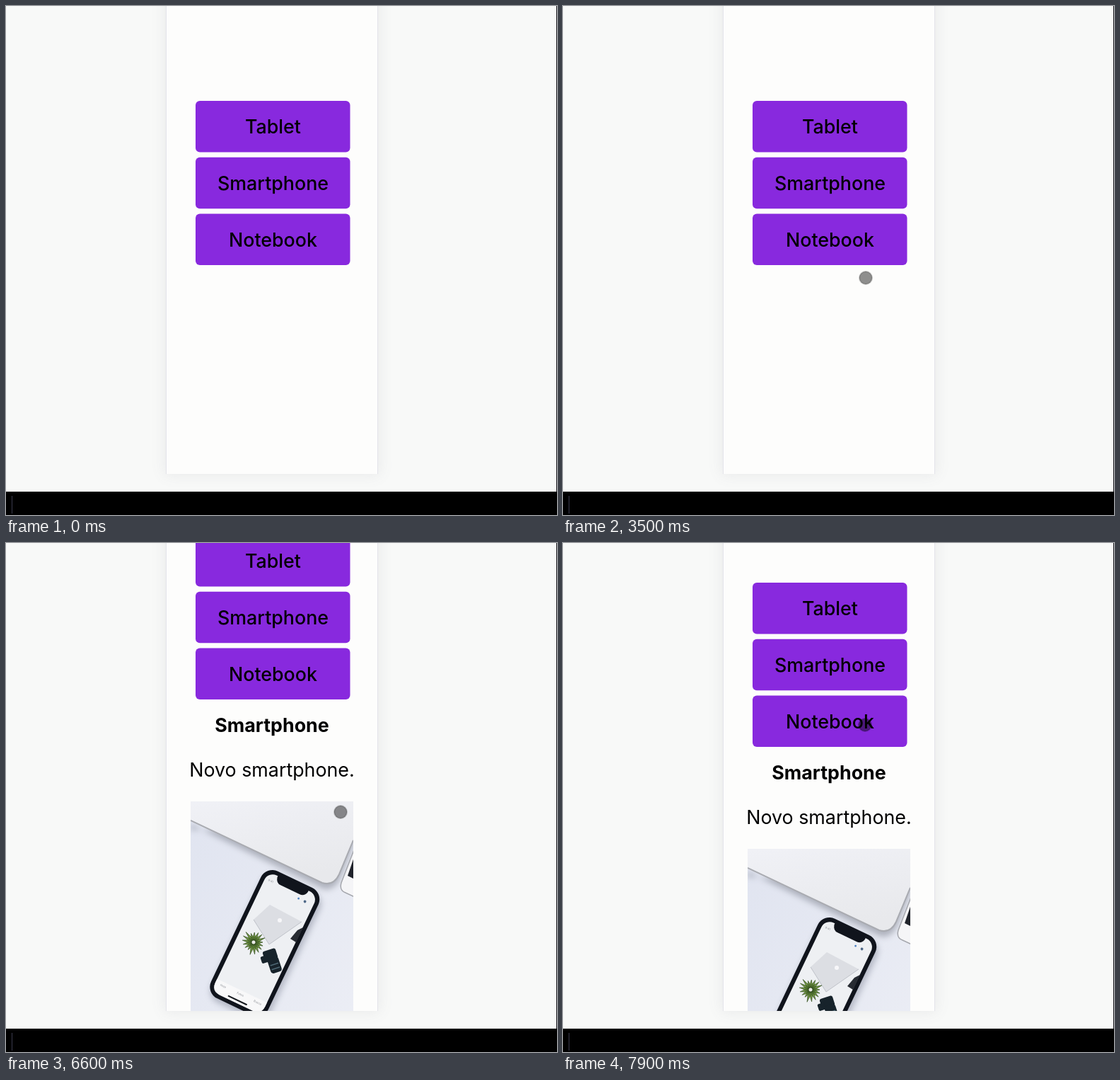
These frames come from a looping animation (779x719 px, 8 s). An HTML page:

```html
<!DOCTYPE html>
<html lang="pt">
<head>
<meta charset="utf-8">
<style>
html, body { margin: 0; width: 100%; height: 100%; overflow: hidden; background: #f8f9f8; }
svg { display: block; }
text { font-family: Inter, "Open Sans", sans-serif; font-size: 26.8px; text-anchor: middle; }
.tiny { font-size: 4px; fill: #8d9096; }
</style>
</head>
<body>
<svg width="779" height="719" viewBox="0 0 779 719">
  <defs>
    <clipPath id="card"><rect x="226" y="0" width="300" height="661"/></clipPath>
    <clipPath id="frame"><rect width="230" height="345"/></clipPath>
    <filter id="soft" x="-30%" y="-30%" width="160%" height="160%"><feGaussianBlur stdDeviation="10"/></filter>
    <filter id="blur"><feGaussianBlur stdDeviation="4"/></filter>
    <linearGradient id="desk" x2="1" y2="1"><stop stop-color="#e0e4f0"/><stop offset="1" stop-color="#eceef5"/></linearGradient>
    <linearGradient id="lid" x2=".3" y2="1"><stop stop-color="#f0f1f6"/><stop offset="1" stop-color="#e8e9ec"/></linearGradient>
  </defs>

  <rect width="779" height="719" fill="#f8f9f8"/>
  <rect x="224" y="-40" width="304" height="703" fill="#667" opacity=".1" filter="url(#soft)"/>
  <rect x="226" y="-2" width="300" height="663" fill="#fdfdfc"/>
  <path d="M226.5 0V661M525.5 0V661" stroke="#e4e4ea"/>

  <g clip-path="url(#card)">
    <g id="page">
      <g id="buttons"></g>
      <g id="result">
        <text x="376" y="412" font-weight="700">Smartphone</text>
        <text x="376" y="475">Novo smartphone.</text>
      </g>
      <g id="photo" transform="translate(261 510)" clip-path="url(#frame)">
        <rect width="230" height="345" fill="url(#desk)"/>
        <path d="M0 32L188 124Q204 126 212 108L230 62V40H0z" fill="#777b88" opacity=".5" filter="url(#blur)"/>
        <path d="M0 0H230V54L210 103Q203 119 188 116L0 28z" fill="url(#lid)"/>
        <path d="M0 27L186 115Q202 120 210 103L230 55" fill="none" stroke="#a9abb1" stroke-width="2"/>
        <path d="M232 66L213 115Q210 126 219 129L232 135z" fill="#f5f5f7" stroke="#a5a7ad" stroke-width="1.5"/>
        <path d="M232 76L222 105L232 110z" fill="#20232b"/>
        <g transform="translate(107 91) rotate(25.5)">
          <rect x="3" y="5" width="92" height="199" rx="18" fill="#555b70" opacity=".35" filter="url(#blur)"/>
          <rect width="90" height="199" rx="18" fill="#10141c"/>
          <rect x="6" y="6" width="78" height="187" rx="13" fill="#eef0f3"/>
          <path d="M21 5H69V8Q67 16 60 16H30Q23 16 21 8z" fill="#10141c"/>
          <text class="tiny" x="15" y="18">9:41</text>
          <circle cx="61" cy="22" r="1.4" fill="#4b7fc0"/>
          <circle cx="71" cy="22" r="1.9" fill="#4d6787"/>
          <path d="M6 174H84V180Q84 193 71 193H19Q6 193 6 180z" fill="#f8f8f9"/>
          <text class="tiny" x="18" y="181">Hoje</text>
          <text class="tiny" x="45" y="181">Fotos</text>
          <text class="tiny" x="72" y="181">Busca</text>
          <path d="M31 189H59" stroke="#15181e" stroke-width="2" stroke-linecap="round"/>
        </g>
        <path d="M89 167L112 146L157 170L111 202z" fill="#dcdee3"/>
        <path d="M89 167L111 202L157 170" fill="none" stroke="#bfc2c9"/>
        <circle cx="126" cy="168" r="3" fill="#f7f7f9"/>
        <path d="M141 194L151 182L159 178L149 199z" fill="#272b32"/>
        <circle cx="89" cy="204" r="8" fill="#e9e9e5"/>
        <path id="leaves" fill="#6f9440" stroke="#344f21" stroke-width=".7"/>
        <g transform="translate(115 226) rotate(-18)" fill="#17232b">
          <rect x="-9" y="-17" width="19" height="15" rx="3"/>
          <rect x="-14" y="-11" width="10" height="10" rx="2"/>
          <rect x="-6" y="-5" width="16" height="22" rx="4"/>
          <path d="M-4 5H8M-4 11H8" stroke="#4e6874" stroke-width="1.5"/>
        </g>
      </g>
    </g>
    <rect id="thumb" x="520" width="2.5" height="488" rx="1" fill="#bdbdc0"/>
  </g>

  <circle id="cursor" r="9" fill="#000" fill-opacity=".44" stroke="#000" stroke-opacity=".2" stroke-width="2"/>
  <path d="M0 686H779V719H0z" fill="#000"/>
  <path d="M8.5 692V717" stroke="#3a3a4c"/>
  <path d="M778.5 0V686" stroke="#16161c"/>
</svg>

<script>
const $ = id => document.getElementById(id);
const LOOP = 8000, STEP = 100;

$("buttons").innerHTML = ["Tablet", "Smartphone", "Notebook"].map((label, i) => {
  const y = 134 + 79.8 * i;
  return `<rect x="268" y="${y}" width="218.5" height="72.5" rx="6" fill="#8829de"/>
    <text x="377.5" y="${y + 46}" font-weight="500">${label}</text>`;
}).join("");

// Spiky plant: narrow triangles around a centre
let leaves = "";
for (let i = 0; i < 17; i++) {
  const a = i * Math.PI * 2 / 17, r = 13 + i * 7 % 6;
  const at = (angle, d) => `${(89 + d * Math.cos(angle)).toFixed(1)} ${(199 + d * Math.sin(angle)).toFixed(1)}`;
  leaves += `M${at(a - .7, 4)}L${at(a, r)}L${at(a + .7, 4)}z`;
}
$("leaves").setAttribute("d", leaves);

// Keys are [time, value...], eased between neighbours
const cursorKeys = [
  [500, 236, 120], [900, 326, 183], [1100, 440, 296], [1200, 393, 267], [1600, 393, 267],
  [2200, 428, 384], [3500, 428, 384], [3900, 440, 521], [4300, 455, 370], [5200, 455, 370],
  [5600, 282, 47], [6100, 430, 340], [6500, 473, 380], [6700, 473, 380],
  [7100, 443, 316], [7300, 443, 316], [7900, 427, 257]
];
const scrollKeys = [[4400, 0], [5000, 145], [6800, 145], [7100, 107.5], [7400, 78]];
const thumbKeys = [[4400, 0], [4500, 1], [5200, 1], [5500, 0], [6800, 0], [6900, 1], [7500, 1], [7800, 0]];

function sample(keys, t) {
  const n = keys.findIndex(k => k[0] > t);
  if (n === 0) return keys[0].slice(1);
  if (n < 0) return keys[keys.length - 1].slice(1);
  const a = keys[n - 1], b = keys[n];
  const p = (1 - Math.cos(Math.PI * (t - a[0]) / (b[0] - a[0]))) / 2;
  return a.slice(1).map((v, i) => v + (b[i + 1] - v) * p);
}

const show = (id, on) => $(id).setAttribute("visibility", on ? "visible" : "hidden");

function draw(now) {
  const t = Math.floor(now % LOOP / STEP) * STEP;
  const [x, y] = sample(cursorKeys, t);
  const [scroll] = sample(scrollKeys, t);
  $("cursor").setAttribute("transform", `translate(${x} ${y})`);
  $("page").setAttribute("transform", `translate(0 ${-scroll})`);
  $("thumb").setAttribute("y", 0.7 + scroll * .733);
  $("thumb").setAttribute("opacity", sample(thumbKeys, t)[0]);
  show("cursor", t >= 500);
  show("result", t >= 3600);
  show("photo", t >= 6300);
}

const start = performance.now();
function tick() {
  draw(performance.now() - start);
  requestAnimationFrame(tick);
}
tick();
</script>
</body>
</html>
```
